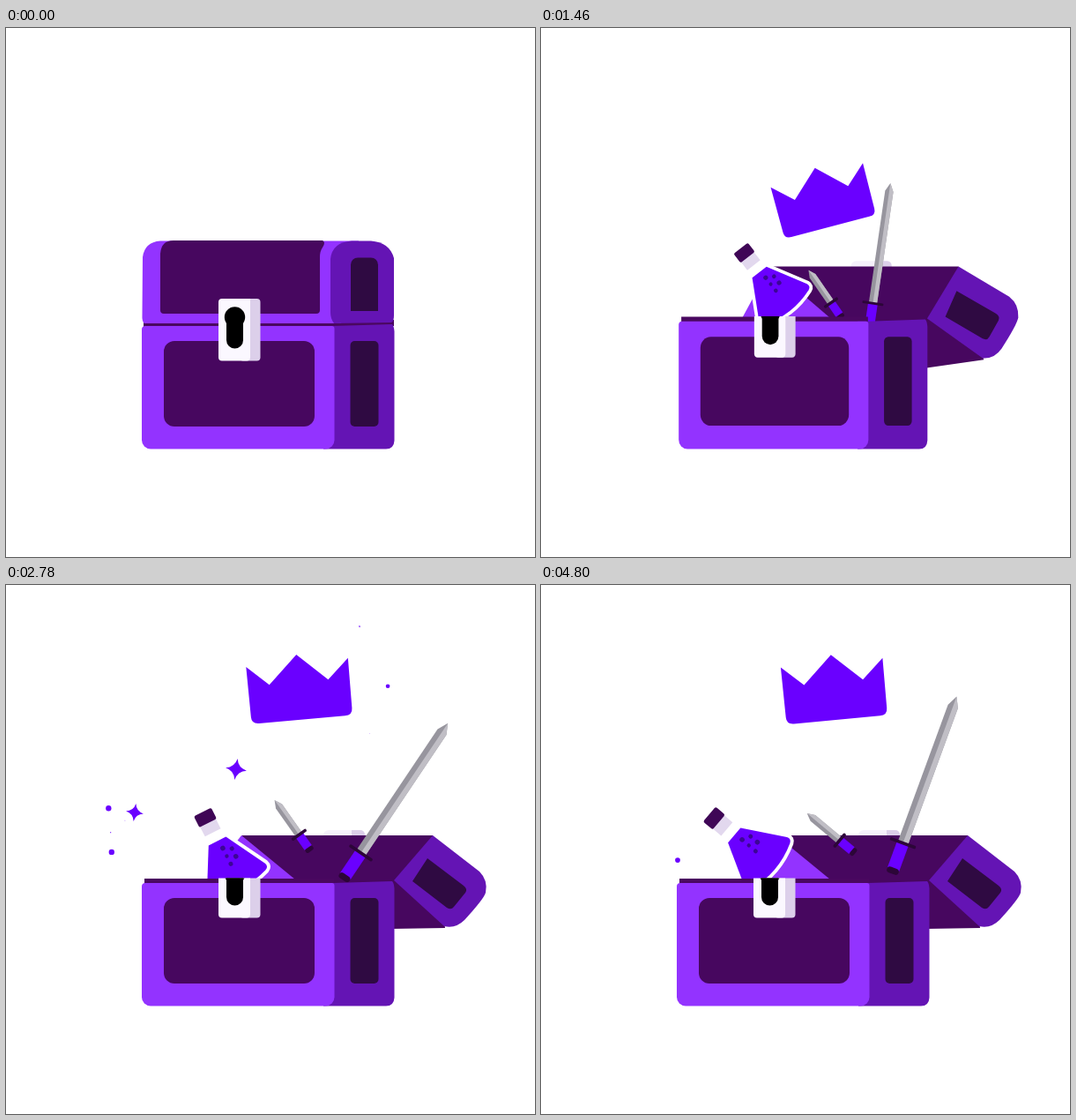
These frames come from a looping animation (600x600 px, 4820 ms). An HTML page with a canvas:

```html
<!DOCTYPE html>
<html lang="en">
<head>
<meta charset="utf-8">
<title>Treasure chest</title>
<style>
html, body { margin: 0; width: 100%; height: 100%; overflow: hidden; background: #fff; }
canvas { display: block; width: 600px; height: 600px; }
</style>
</head>
<body>
<canvas id="stage" width="600" height="600"></canvas>
<script>
const ctx = document.getElementById('stage').getContext('2d');
const LOOP = 4820, OPEN = 1290, SQUASH = 780, TAU = Math.PI * 2;
const C = {
  front: '#9333ff', panel: '#47075f', side: '#6414b4', sidePanel: '#2f0a42',
  seam: '#4a0860', vivid: '#6a00ff', white: '#fbf8ff', lilac: '#dccfea',
  dark: '#2c0638', cork: '#3f0656', steel: '#c0bec5', shade: '#97959e', bubble: '#3c0696'
};

// Motion rules; u is the time since the lid opened
const rad = deg => deg * Math.PI / 180;
const spring = (u, decay = .005) => Math.exp(-decay * u) * Math.cos(TAU * u / 1000);
const grow = (u, power) => 1 - Math.pow(1 - Math.min(1, u / 260), power);
const wave = (t, peak, period) => Math.cos(TAU * (t - peak) / period);

// Drawing helpers
const fill = (color, d) => { ctx.fillStyle = color; ctx.fill(new Path2D(d)); };
function box(color, x, y, x2, y2, r) {
  ctx.fillStyle = color;
  ctx.beginPath();
  ctx.roundRect(x, y, x2 - x, y2 - y, r);
  ctx.fill();
}
function dot(color, x, y, r) {
  ctx.fillStyle = color;
  ctx.beginPath();
  ctx.arc(x, y, r, 0, TAU);
  ctx.fill();
}
function place(x, y, angle, sx, sy, draw) {
  ctx.save();
  ctx.translate(x, y);
  ctx.rotate(rad(angle));
  ctx.scale(sx, sy);
  draw();
  ctx.restore();
}

function crown() {
  fill(C.vivid, 'M-58-32L-33.5-9.6L0-41L33.5-9.6L58-32L57.5 25Q57.5 33 49 33H-49Q-57.5 33-57.5 25Z');
}

function blade(length, w, guard, grip, gw) {
  const outline = `V${w * 2 - length}L0 ${-length}L${w} ${w * 2 - length}V0Z`;
  fill(C.shade, `M${-w} 0` + outline);
  fill(C.steel, 'M0 0' + outline);
  box(C.vivid, -gw, 0, gw, grip - 5, 0);
  box(C.dark, -gw, grip - gw, gw, grip, gw * .5);
  box(C.dark, -guard, -1.7, guard, 1.9, 1.5);
}

function flask() {
  const body = 'M-11 0H11L37 47Q39 52 34 54Q0 66-34 54Q-39 52-37 47Z';
  ctx.strokeStyle = '#fff';
  ctx.lineWidth = 8;
  ctx.stroke(new Path2D(body));
  box('#fff', -10, -23, 10, 2, 0);
  box('#e2d8ee', -10, -24, 10, -11, 0);
  fill(C.vivid, body);
  box(C.cork, -11, -37, 11, -23, 2);
  for (let i = 0; i < 5; i++) dot(C.bubble, 2 + i % 2 * 9, 10 + i * 5, 2.8 - i % 3 * .3);
}

function items(t, u) {
  const sway = wave(t, 3250, 3600), bob = wave(t, 2860, 1800);
  const kick = spring(u), whip = spring(u, .007), fade = Math.exp(-u / 400);
  const big = grow(u, 2.5), late = grow(u, 1.4);
  ctx.save();
  ctx.beginPath();
  ctx.rect(0, 0, 600, 450);
  ctx.clip();
  place(406 - 5 * sway - 240 * whip, 299 + 7 * sway + 140 * whip,
    29.5 - .0068 * (t - 3420) - 240 * whip, late, late, () => blade(177, 6, 15.5, 37, 7));
  place(335 - 4 * sway - 50 * kick, 286 - 4 * sway + 106 * kick,
    -42 + 9 * sway + 25 * fade, big, big, () => blade(48, 4.3, 10, 23, 5));
  place(330 + 3 * bob - 50 * kick, 120 + 374 * kick, -8.2 + 3.2 * bob - 35 * kick, big, big, crown);
  place(268 + 25 * fade, 338 + 14 * sway, -37 + 14 * sway + 20 * fade, big, big, () => {
    ctx.translate(0, -64); // swings around its base
    flask();
  });
  ctx.restore();
}

// The lid turns around its hinge; its front edge follows the corner
function openLid(u) {
  const hx = 440, hy = 334, angle = -58 * spring(u, .007);
  const cos = Math.cos(rad(angle)), sin = Math.sin(rad(angle));
  const turn = (x, y) => [hx + x * cos - y * sin, hy + x * sin + y * cos];
  const [x, y] = turn(44, -50), left = x - 217;
  box('#f5f0fb', x - 124, y - 6, x - 88, y + 2, [6, 0, 0, 0]);
  box(C.lilac, x - 92, y - 6, x - 77, y + 2, [0, 5, 0, 0]);
  fill(C.panel, `M${left} ${y}L${x} ${y}L${turn(58, 55)}L436 ${turn(0, 56)[1]}V350H310Z`);
  fill(C.front, `M${left} ${y}L328 334L340 350H225V338Z`);
  place(hx, hy, angle, 1, 1, () => {
    fill(C.side, 'M44-50L97-9Q107 1 104 15Q102 22 80 46Q70 56 57 53L0 1Z');
    fill(C.sidePanel, 'M38-24L79 7Q84 11 81 15L68 31Q65 35 60 32L21 2Z');
  });
}

function closedLid() {
  fill(C.front, 'M157 335Q154 333 154.500 325L155 260Q157 243 175 241.500H400L380 335Z');
  fill(C.side, 'M372 335Q368 330 368 322V262Q370 243 392 241.500H414Q435 243 440 261V326Q440 333 437 334Z');
  fill(C.panel, 'M175 320V256Q176 241 190 241H359Q363 243 359 249Q356 253 356 260V320Q356 324 352 324H179Q175 324 175 320Z');
  box(C.sidePanel, 391, 260.5, 422, 321, [8, 8, 0, 0]);
}

function lock(open) {
  ctx.save();
  if (open) {
    ctx.beginPath();
    ctx.rect(230, 332.5, 70, 60);
    ctx.clip();
  }
  box(C.lilac, 265, 307, 288.5, 377.5, 4);
  box(C.white, 241, 307, 277, 377.5, [4, 0, 4, 4]);
  dot('#000', 259.5, 328, 11.7);
  box('#000', 250, 322, 269, 363.5, 9.5);
  ctx.restore();
}

function chestBody(open) {
  if (open) box(C.seam, 157, 333, 372, 343, 0);
  else fill(C.seam, 'M156 333H372L440 331V338L372 340H156Z');
  fill(C.side, 'M360 338L372 338L438 336Q440 338 440.500 344V468Q440 477.500 431 477.500H360Z');
  box(C.front, 154, 338, 372.5, 477.5, [4, 3, 10, 10]);
  box(C.panel, 179, 355, 350, 452, 12);
  box(C.sidePanel, 390.5, 355, 422.5, 452, 5);
}

// Crouches before opening, then stretches and settles
function onChest(t, draw) {
  const u = t - OPEN, p = (t - SQUASH) / (OPEN - SQUASH);
  const squash = p > 0 && p < 1 ? .24 * Math.sin(Math.PI * p) ** 2 : 0;
  const stretch = u > 0 ? .3 * spring(u, .007) * grow(u, 2) : 0;
  place(297 + 37 * squash, 477.5, 0, 1 + squash - stretch * .4, 1 - 1.1 * squash + stretch, () => {
    ctx.translate(-297, -477.5);
    draw();
  });
}

// Bursts of stars [x, y, radius], each joined by a few random dots
const wide = [[411, 71, 6], [468, 241, 14], [111, 302, 13]];
const bursts = [
  { time: 370, stars: wide },
  { time: 2000, stars: [[374, 181, 14], [144, 233, 12], [85, 327, 10], [116, 363, 14]] },
  { time: 2850, stars: [[261, 209, 12], [146, 258, 10]] },
  { time: 3090, stars: [[401, 47, 8]] },
  { time: 3610, stars: wide },
  { time: 4250, stars: [[150, 250, 10], [425, 80, 9]] },
  { time: 4700, stars: [] }
];
let seed = 11;
const rand = () => (seed = seed * 16807 % 2147483647) / 2147483647;
for (const burst of bursts) {
  burst.dots = Array.from({ length: 1 + burst.time % 4 }, (_, i) => i % 2
    ? [400 + rand() * 40, 65 + rand() * 130, 2 + rand() * 4]
    : [110 + rand() * 45, 200 + rand() * 140, 2 + rand() * 2]);
}

function sparkle({ time, stars, dots }, t) {
  const phase = (t - time) / 330;
  if (Math.abs(phase) >= 1) return;
  const size = Math.min(1, 1.6 * Math.cos(phase * Math.PI / 2));
  for (const [x, y, r] of dots) dot(C.vivid, x, y, r * size);
  for (const [x, y, r] of stars) {
    place(x, y, 8, r * size, r * size, () =>
      fill(C.vivid, 'M0-1Q.16-.16 1 0Q.16 .16 0 1Q-.16 .16-1 0Q-.16-.16 0-1Z'));
  }
}

function draw(t) {
  const u = t - OPEN, open = u >= 0;
  ctx.fillStyle = '#fff';
  ctx.fillRect(0, 0, 600, 600);
  if (open) {
    onChest(t, () => openLid(u));
    items(t, u);
  }
  onChest(t, () => {
    chestBody(open);
    if (!open) closedLid();
    lock(open);
  });
  bursts.forEach(b => sparkle(b, t));
}

const start = performance.now();
function tick() {
  draw((performance.now() - start) % LOOP);
  requestAnimationFrame(tick);
}
tick();
</script>
</body>
</html>
```
